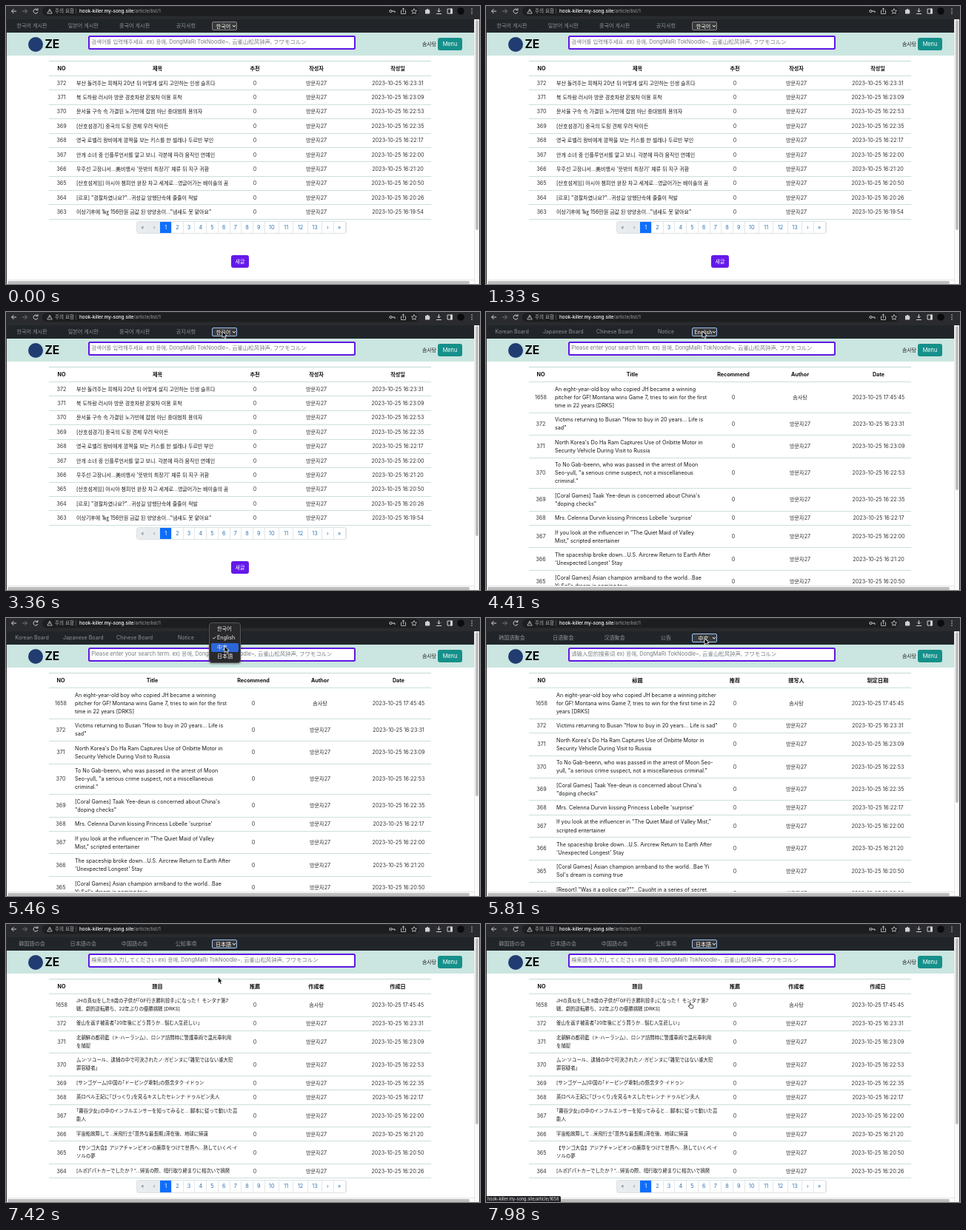
Animation, 640 px wide and 376 px high, one loop 8 s. Source, as an HTML page:

```html
<!DOCTYPE html>
<html lang="ko">
<head>
<meta charset="utf-8">
<style>
html, body { margin: 0; width: 640px; height: 376px; overflow: hidden; background: #fff; }
body { position: relative; color: #212529; font-size: 7.1px; }
:lang(ko) { font-family: Inter, 'Noto Sans CJK KR', 'Noto Sans CJK', sans-serif; }
:lang(en) { font-family: Inter, 'Noto Sans CJK KR', 'Noto Sans CJK', sans-serif; }
:lang(zh) { font-family: Inter, 'Noto Sans CJK SC', 'Noto Sans CJK', sans-serif; }
:lang(ja) { font-family: Inter, 'Noto Sans CJK JP', 'Noto Sans CJK', sans-serif; }
body *, svg { box-sizing: border-box; }
.abs, .mid, .left { position: absolute; white-space: pre; line-height: 1; }
.mid { transform: translate(-50%, -50%); }
.left { transform: translateY(-50%); }
#bar { left: 0; top: 0; width: 640px; height: 18px; background: #2a2b2e; }
#nav { left: 0; top: 18px; width: 632px; height: 18px; background: #212529; }
#nav .mid { color: #909295; top: 9px; }
#banner { left: 0; top: 36px; width: 632px; height: 31px; background: #cbe5e0; }
#search { left: 110.7px; top: 39.5px; width: 361.5px; height: 19px; background: #fff; border: 2.5px solid #5f17e3;
  border-radius: 2.5px; padding-left: 2.5px; line-height: 14px; font-size: 7.4px; color: #777b80; }
#menu { left: 583px; top: 43px; width: 33px; height: 17px; border-radius: 3px; background: #16908a;
  color: #fff; font-size: 7.4px; line-height: 17px; text-align: center; }
#select { left: 278px; top: 21px; width: 34px; height: 12px; border: 1px solid #858585; border-radius: 2px;
  background: #3a3a3b; color: #fff; }
#select.focus { border-color: #9dc3f7; }
#label { left: 14.5px; top: 5px; font-size: 7px; }
#page { left: 0; top: 0; width: 632px; height: 370px; overflow: hidden; }
#list { position: absolute; left: 58px; top: 74px; width: 516px; border-top: 1px solid #c3d9d6; }
.row { display: grid; align-items: center; text-align: center; border-bottom: 1px solid #cbdfdd;
  padding: 3.65px 0; line-height: 11.1px; white-space: pre; color: #333; font-size: 7.15px; }
.row.head { padding: .9px 0 0; line-height: 18.2px; font-weight: 700; color: #111; }
.row > :nth-child(2) { padding-left: 3px; }
.title { text-align: left; color: #16181b; }
.title:lang(ko) { font-size: 7px; }
.title:lang(zh) { font-size: 6.75px; }
.title:lang(ja) { font-size: 6.4px; }
#pages { position: absolute; left: 118px; top: calc(100% + 2px); display: flex; border: 1px solid #dee2e6;
  border-radius: 3px; line-height: 16px; height: 17.5px; text-align: center; color: #2d73b5; font-size: 7.2px; overflow: hidden; }
#pages span { width: 15.7px; border-right: 1px solid #e3e7ea; }
#pages .wide { width: 19.4px; }
#pages .off { background: #e9ecef; color: #6c757d; }
#pages .on { background: #0d6efd; color: #fff; }
#write { position: absolute; left: 258px; top: calc(100% + 48.5px); transform: translateX(-50%); padding: 0 5.5px;
  height: 17px; line-height: 17px; border-radius: 3px; background: #6418ea; color: #fff; white-space: pre; }
#gutter { left: 632px; top: 18px; width: 8px; height: 358px; background: #fafafa; border-left: 1px solid #e6e6e6; }
#thumb { left: 633.5px; top: 19px; width: 4px; border-radius: 2px; background: #bdbdbd; }
#floor { left: 0; top: 370px; width: 632px; height: 6px; background: #fafafa; border-top: 1px solid #e6e6e6; }
#floor i { position: absolute; left: 2px; top: 1px; width: 624px; height: 3.5px; border-radius: 2px; background: #bdbdbd; }
#edges { left: 0; top: 18px; width: 640px; height: 358px; border: solid #333; border-width: 0 1px; }
#status { left: 0; top: 367.5px; height: 8.5px; padding: 0 3px 0 2px; line-height: 8px; background: #202124;
  color: #eee; font-size: 5.6px; border-top-right-radius: 2px; }
#popup { left: 274px; width: 43px; height: 55.2px; padding: 2px; border: 1px solid #555659; border-radius: 4px;
  background: #29292b; color: #f2f2f2; box-shadow: 0 1px 3px #0006; }
#popup div { position: relative; height: 12.3px; line-height: 12.3px; padding-left: 8px; border-radius: 2px; }
#popup .hover { background: #2a66d8; }
#popup .picked::before { content: "✓"; position: absolute; left: 1px; }
#cursor { left: 0; top: 0; width: 12px; height: 14px; overflow: visible; }
</style>
</head>
<body>
<div id="page" class="abs">
  <div id="nav" class="abs"></div>
  <div id="banner" class="abs"></div>
  <svg class="abs" style="left:30px;top:42px" width="20" height="20"><circle cx="10" cy="10" r="10" fill="#203c70"/></svg>
  <b class="left" style="left:52.5px;top:51.5px;font-size:15.5px;color:#000">ZE</b>
  <div id="search" class="abs"></div>
  <span class="left" style="left:562px;top:51.5px;font-size:6.9px">솜사탕</span>
  <div id="menu" class="abs">Menu</div>
  <div id="list"><div id="rows"></div><div id="pages"></div><div id="write"></div></div>
</div>
<div id="select" class="abs">
  <span id="label" class="mid"></span>
  <svg class="abs" style="left:26px;top:3px" width="6" height="5"><path d="M1 1l2 2.2L5 1" fill="none" stroke="#fff"/></svg>
</div>
<div id="gutter" class="abs"></div><div id="thumb" class="abs"></div>
<div id="floor" class="abs"><i></i></div>
<div id="edges" class="abs"></div>
<div id="bar" class="abs">
  <svg class="abs" style="left:0;top:0" width="640" height="18" fill="none" stroke="#d0d1d3" stroke-width="1">
    <rect x="49" y="1" width="508" height="12.5" rx="6.2" fill="#1d1e20" stroke="none"/>
    <path d="M14 7H7.500m3-3l-3 3 3 3"/>
    <path d="M22 7h6.500m-3-3l3 3-3 3" stroke="#77797c"/>
    <path d="M42.500 5.300a3 3 0 1 0 .4 2.700M43 3v2.600h-2.600"/>
    <path d="M59 4l3.200 6h-6.400zM59 6v2" stroke-width=".8"/>
    <path d="M94.500 3.500v7" stroke="#5d5f63" stroke-width=".7"/>
    <circle cx="519.500" cy="7" r="1.600"/><path d="M521 7h4v2"/>
    <path d="M534.500 6h-1v4.500h6V6h-1M536.500 8.500V3m-1.700 1.500L536.500 3l1.700 1.500" stroke-width=".8"/>
    <path d="M551 3.500l1.100 2.400 2.500.3-1.900 1.700.5 2.500-2.200-1.300-2.200 1.300.5-2.500-1.900-1.700 2.500-.3z" stroke-width=".8"/>
    <path d="M566 5h2a1.200 1.200 0 0 1 2.400 0h1.600v2a1.200 1.200 0 0 1 0 2v1.500h-6z" fill="#d0d1d3" stroke="none"/>
    <path d="M584.500 3v5m-2.300-2.200l2.300 2.300 2.300-2.300M581 10.500h7"/>
    <path d="M596 4h6.500v6H596z"/><path d="M600.500 4h2v6h-2z" fill="#d0d1d3"/>
    <circle cx="614" cy="7" r="4.800" fill="#0c0c0e" stroke="none"/>
    <g fill="#d0d1d3" stroke="none"><circle cx="629" cy="4" r=".8"/><circle cx="629" cy="7" r=".8"/><circle cx="629" cy="10" r=".8"/></g>
  </svg>
  <span class="left" style="left:66px;top:7.3px;color:#b8babd;font-size:6.6px">주의 요함</span>
  <span class="left" style="left:99px;top:7.3px;color:#9b9da1;font-size:6.35px"><span style="color:#fff;font-weight:500">hook-killer.my-song.site</span>/article/list/1</span>
</div>
<div id="status" class="abs">hook-killer.my-song.site/article/1658</div>
<div id="popup" class="abs"></div>
<svg id="cursor" class="abs" stroke="#fff" stroke-width=".8" fill="#000">
  <path id="arrow" d="M0 0V8.500L2 6.700 3.500 9.800 5 9.100 3.600 6.100H6.200Z"/>
  <path id="hand" transform="scale(.85)" fill="#fff" stroke="#000" d="M0 .8Q.8 -.4 1.600.8V4L5 4.600Q6 5 5.800 6L5 9.500H.8L-2 6Q-2 4.800 -.8 5.400L0 6Z"/>
</svg>
<script>
const $ = id => document.getElementById(id);
const lines = s => s.trim().split('\n');
const CODES = ['ko', 'en', 'zh', 'ja'];
const NAMES = ['한국어', 'English', '中文', '日本語'];
const NAV = ['한국어 게시판,일본어 게시판,중국어 게시판,공지사항', 'Korean Board,Japanese Board,Chinese Board,Notice',
  '韩国语聚会,日语聚会,汉语聚会,公告', '韓国語の会,日本語の会,中国語の会,公知事項'];
const HEADS = ['NO,제목,추천,작성자,작성일', 'NO,Title,Recommend,Author,Date',
  'NO,标题,推荐,撰写人,制定日期', 'NO,題目,推薦,作成者,作成日'];
const PROMPTS = ['검색어를 입력해주세요.', 'Please enter your search term.', '请输入您的搜索词', '検索語を入力してください'];
const WRITE = ['새글', 'New Article', '新文章', '新しい文'];
const TIMES = '17:45:45 16:23:31 16:23:09 16:22:53 16:22:35 16:22:17 16:22:00 16:21:20 16:20:50 16:20:26 16:19:54'.split(' ');

// "|" always breaks the line, "<" only in the narrow English column, ">" only in the wider ones.
const TITLES = [`
부산 돌려주는 피해자 20년 뒤 어떻게 살지 고민하는 인생 슬프다
북 도하람 러시아 방문 경호차량 온빛차 이용 포착
문서율 구속 속 가결된 노가빈에 잡범 아닌 중대범죄 용의자
[산호섬경기] 중국의 도핑 견제 우려 탁이든
영국 로벨리 왕비에게 깜짝을 보는 키스를 한 셀레나 두르빈 부인
안개 소녀 중 인플루언서를 알고 보니. 각본에 따라 움직인 연예인
우주선 고장나서...美비행사 '뜻밖의 최장기' 체류 뒤 지구 귀환
[산호섬게임] 아시아 챔피언 완장 차고 세계로...영글어가는 배이솔의 꿈
[르포] "경찰차였나요?"...귀성길 암행단속에 줄줄이 적발
이상기후에 1㎏ 156만원 금값 된 양양송이..."냄새도 못 맡아요"`, `
An eight-year-old boy who copied JH became a winning <pitcher >for GF! Montana wins Game 7, tries to win for the first <time in 22 >years [DRKS]
Victims returning to Busan "How to buy in 20 years... Life is <sad"
North Korea's Do Ha Ram Captures Use of Onbitte Motor in|Security Vehicle During Visit to Russia
To No Gab-beenn, who was passed in the arrest of Moon <Seo->yull, "a serious crime suspect, not a miscellaneous <criminal."
[Coral Games] Taak Yee-deun is concerned about China's|"doping checks"
Mrs. Celenna Durvin kissing Princess Lobelle 'surprise'
If you look at the influencer in "The Quiet Maid of Valley <Mist," >scripted entertainer
The spaceship broke down...U.S. Aircrew Return to Earth After|'Unexpected Longest' Stay
[Coral Games] Asian champion armband to the world...Bae <Yi >Sol's dream is coming true
[Report] "Was it a police car?""...Caught in a series of secret|crackdowns on the way home`, `
模仿JH的8岁小朋友成为了"GF行胜利投手"！ 蒙大拿州云海狸队在第7场|戏剧性地反败为胜，时隔22年挑战冠军
返回釜山的受害者:"20年后如何生活......苦恼的人生令人惋惜
北韩都荷蓝访问俄罗斯时，在警卫车辆中捕捉到温光汽车使用情况
文瑞律，对逮捕中通过的卢佳彬说"不是杂犯而是重大犯罪嫌疑人"
担心中国牵制兴奋剂卓怡登
塞蕾娜•杜尔文女士看到"惊喜"后亲吻了英国洛贝丽王妃
了解一下《雾谷少女》中的网红... 根据剧本行动的艺人
宇宙飞船坏了...美国飞行员"意外最长"滞留后返回地球
[珊瑚会] 亚洲冠军 戴上臂章走向世界...逐渐消失的裴以率的梦想
[报告] "是警车吗？"...回乡路暗访查处接连被揭发`, `
JHの真似をした8歳の子供が｢GF行き勝利投手｣になった！ モンタナ第7|戦、劇的逆転勝ち、22年ぶりの優勝挑戦 [DRKS]
釜山を返す被害者｢20年後にどう買うか…悩む人生悲しい｣
北朝鮮の都荷藍（ト·ハーランム）、ロシア訪問時に警護車両で温光車利用|を捕捉
ムン·ソユール、逮捕の中で可決されたノ·ガビンヌに｢雑犯ではない重大犯|罪容疑者｣
[サンゴゲーム]中国の｢ドーピング牽制｣の懸念タク·イドゥン
英ロベル王妃に｢びっくり｣を見るキスしたセレンナ·ドゥルビン夫人
｢霧谷少女｣の中のインフルエンサーを知ってみると... 脚本に従って動いた芸|能人
宇宙船故障して…米飛行士｢意外な最長期｣滞在後、地球に帰還
【サンゴ大会】アジアチャンピオンの腕章をつけて世界へ…熟していくペ·イ|ソルの夢
[ルポ]｢パトカーでしたか？"...帰省の際、暗行取り締まりに相次いで摘発`].map(lines);

// Each language choice: popup opens, closes, then labels and articles follow.
const CHOICES = [[2660, 3290], [4760, 5600], [6370, 7070]];
const LABEL_DELAY = 140, ARTICLE_DELAY = 280, ITEM = 12.3;

// Pointer tip: time, x, y
const PATH = [[2030, 288, 66], [2450, 291, 37], [2600, 292, 26], [2800, 292, 26], [2950, 294, 38], [3200, 294, 38],
  [3330, 292, 26], [4900, 292, 26], [5150, 295, 38], [5550, 295, 38], [5740, 295, 27.5], [6450, 295, 27.5],
  [6650, 297, 39], [7150, 297, 39], [7700, 275, 106]];

function pointer(t) {
  const i = PATH.findIndex(p => p[0] > t);
  if (i < 0) return PATH.at(-1).slice(1);
  if (i === 0) return PATH[0].slice(1);
  const [a, b] = [PATH[i - 1], PATH[i]];
  const u = (t - a[0]) / (b[0] - a[0]), e = u * u * (3 - 2 * u);
  return [1, 2].map(k => a[k] + (b[k] - a[k]) * e);
}

function drawPage(lang, body) {
  document.documentElement.lang = CODES[lang];
  $('nav').innerHTML = NAV[lang].split(',').map((s, i) =>
    `<span class="mid" style="left:${35 + 69.3 * i}px">${s}</span>`).join('');
  $('search').textContent = PROMPTS[lang] + ' ex) 응애, DongMaRi TokNoodle~, 云雀山松风钟声, フワモコルン';
  $('label').textContent = NAMES[lang];
  $('write').textContent = WRITE[lang];

  const narrow = lang === 1;
  const cols = narrow ? '32px 212px 64px 116px 96px' : '34px 222px 44px 122px 98px';
  const row = (cells, cls = '') =>
    `<div class="row ${cls}" style="grid-template-columns:${cols}">${cells.join('')}</div>`;
  const cell = s => `<span>${s}</span>`;
  const first = body ? 0 : 1;
  const rows = TITLES[body].map((title, i) => {
    const n = i + first;
    const text = title.replace(narrow ? /[|<]/g : /[|>]/g, '\n').replace(/[<>]/g, '');
    return row([cell(n ? 373 - n : 1658), `<span class="title" lang="${CODES[body]}">${text}</span>`, cell(0),
      cell(n ? '방문자27' : '솜사탕'), cell('2023-10-25 ' + TIMES[n])]);
  });
  $('rows').innerHTML = row(HEADS[lang].split(',').map(cell), 'head') + rows.join('');
  $('thumb').style.height = 352 * 352 / ($('list').offsetHeight + 221) + 'px';
}

$('pages').innerHTML = ['«', '‹', ...Array.from({ length: 13 }, (_, i) => i + 1), '›', '»'].map((s, i) =>
  `<span class="${i < 2 ? 'off' : s === 1 ? 'on' : s > 9 ? 'wide' : ''}">${s}</span>`).join('');
$('popup').innerHTML = NAMES.map(s => `<div>${s}</div>`).join('');

const show = (id, on) => $(id).style.display = on ? '' : 'none';
let drawn = '';

function frame() {
  const t = performance.now() % 8000;
  const passed = delay => CHOICES.filter(c => t >= c[1] + delay).length;
  const lang = passed(LABEL_DELAY), body = passed(ARTICLE_DELAY);
  if (drawn !== lang + '/' + body) {
    drawPage(lang, body);
    drawn = lang + '/' + body;
  }

  const [x, y] = pointer(t);
  const top = 27.5 - lang * ITEM - 9;
  const hovered = Math.floor((y - top - 3) / ITEM);
  show('popup', CHOICES.some(([open, close]) => t >= open && t < close));
  $('popup').style.top = top + 'px';
  [...$('popup').children].forEach((item, i) =>
    item.className = (i === lang ? 'picked ' : '') + (i === hovered ? 'hover' : ''));
  $('select').classList.toggle('focus', t >= CHOICES[0][0]);

  const onLink = y > 95;
  show('cursor', t >= PATH[0][0]);
  show('arrow', !onLink);
  show('hand', onLink);
  $('cursor').style.transform = `translate(${x}px, ${y}px)`;
  show('status', t >= 7840);
  requestAnimationFrame(frame);
}
frame();
</script>
</body>
</html>
```
